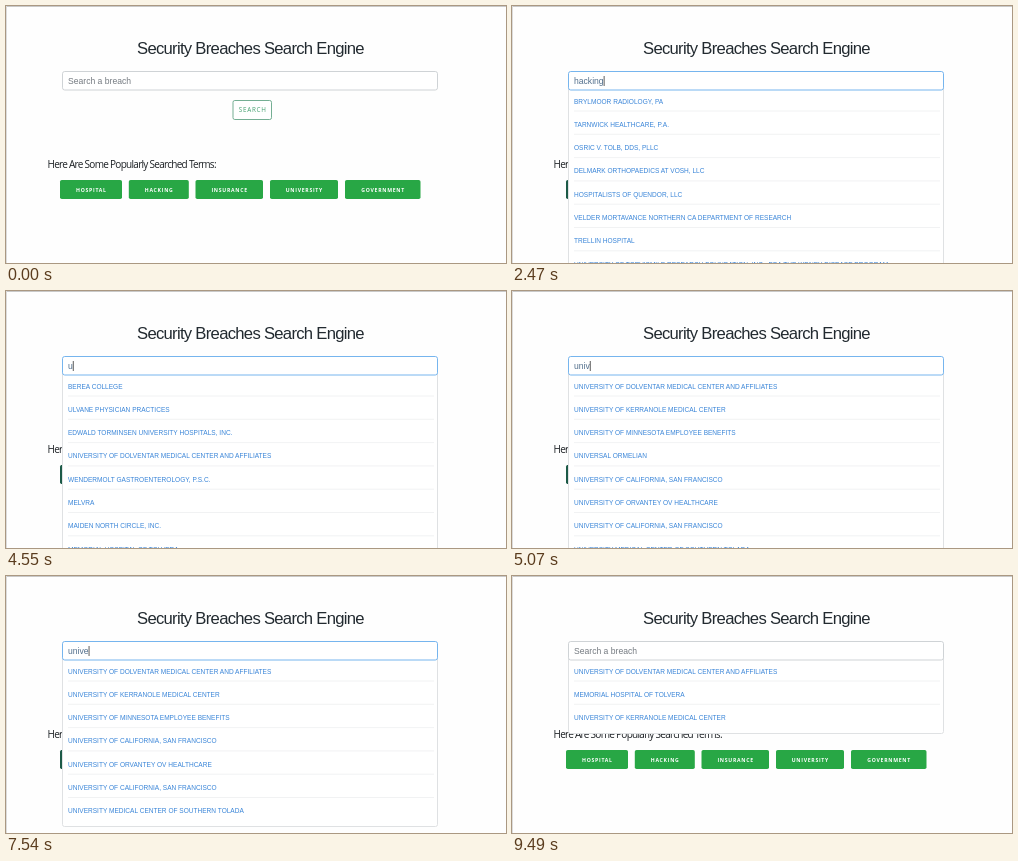
An HTML page that plays this animation: 500x257 px, repeating every 9.62 s.

```html
<!DOCTYPE html>
<html lang="en">
<head>
<meta charset="utf-8">
<title>Security Breaches Search Engine</title>
<style>
  html, body { margin: 0; width: 100%; height: 100%; overflow: hidden; background: #fefefe; }
  svg { display: block; width: 100%; height: 100%; font-family: "Liberation Sans", Arial, sans-serif; }
  text { white-space: pre; }
  .title { font-size: 16.66px; letter-spacing: -.715px; fill: #222a30; }
  .heading { font: 10px "Open Sans", sans-serif; letter-spacing: -.715px; fill: #1c2024; }
  .search { font: 6.3px "Open Sans", sans-serif; letter-spacing: .715px; fill: #45a070; }
  .term { font: bold 5.15px "Open Sans", sans-serif; letter-spacing: .715px; fill: #fff; text-anchor: middle; }
  .query { font-size: 8.6px; }
  .row { font-size: 6.55px; fill: #3b86d8; }
</style>
</head>
<body>
<svg viewBox="0 0 500 257">
  <path d="M0 .5H500" stroke="#c9c9c9"/>
  <path d="M.5 0V257" stroke="#dcdcdc"/>
  <text class="title" x="131" y="48">Security Breaches Search Engine</text>
  <rect x="227" y="94.5" width="38.5" height="19" rx="1.8" fill="#fff" stroke="#74ae93"/>
  <text class="search" x="232.8" y="106.2">SEARCH</text>
  <text class="heading" x="41.5" y="162">Here Are Some Popularly Searched Terms:</text>
  <g id="terms"></g>
  <g id="lists"></g>
  <rect id="field" x="56.5" y="65.5" width="375" height="18.5" rx="2.2" fill="#fff"/>
  <text id="query" class="query" x="62" y="78"></text>
  <path id="caret" d="M.5 70V80" stroke="#333" stroke-width=".8"/>
</svg>
<script>
const LOOP = 9620, BLINK = 520, ROW = 23.3;
const $ = id => document.getElementById(id);

function add(parent, tag, attrs, text = '') {
  const node = document.createElementNS('http://www.w3.org/2000/svg', tag);
  for (const key in attrs) node.setAttribute(key, attrs[key]);
  node.textContent = text;
  return parent.appendChild(node);
}

const dolventar = 'UNIVERSITY OF DOLVENTAR MEDICAL CENTER AND AFFILIATES';
const kerranole = 'UNIVERSITY OF KERRANOLE MEDICAL CENTER';
const minnesota = 'UNIVERSITY OF MINNESOTA EMPLOYEE BENEFITS';
const california = 'UNIVERSITY OF CALIFORNIA, SAN FRANCISCO';
const orvantey = 'UNIVERSITY OF ORVANTEY OV HEALTHCARE';
const tolada = 'UNIVERSITY MEDICAL CENTER OF SOUTHERN TOLADA';
const tolvera = 'MEMORIAL HOSPITAL OF TOLVERA';

const results = {
  hacking: [
    'BRYLMOOR RADIOLOGY, PA',
    'TARNWICK HEALTHCARE, P.A.',
    'OSRIC V. TOLB, DDS, PLLC',
    'DELMARK ORTHOPAEDICS AT VOSH, LLC',
    'HOSPITALISTS OF QUENDOR, LLC',
    'VELDER MORTAVANCE NORTHERN CA DEPARTMENT OF RESEARCH',
    'TRELLIN HOSPITAL',
    'UNIVERSITY OF TORVISMILE RESEARCH FOUNDATION, INC., DBA THE KIDNEY DISEASE PROGRAM'
  ],
  mixed: [
    'BEREA COLLEGE',
    'ULVANE PHYSICIAN PRACTICES',
    'EDWALD TORMINSEN UNIVERSITY HOSPITALS, INC.',
    dolventar,
    'WENDERMOLT GASTROENTEROLOGY, P.S.C.',
    'MELVRA',
    'MAIDEN NORTH CIRCLE, INC.',
    tolvera
  ],
  univers: [dolventar, kerranole, minnesota, 'UNIVERSAL ORMELIAN', california, orvantey, california, tolada],
  university: [dolventar, kerranole, minnesota, california, orvantey, california, tolada],
  short: [dolventar, tolvera, kerranole]
};

// Each table holds [start in ms, value].
const typing = [
  [0, ''],
  ...[...'hacking'].map((_, i) => [1690 + 130 * i, 'hacking'.slice(0, i + 1)]),
  [2990, 'hackin'], [3510, 'ha'], [3640, ''],
  [4550, 'u'], [4810, 'un'], [4940, 'uni'], [5070, 'univ'], [5200, 'unive'],
  [5330, 'univer'], [5460, 'univers'], [5720, 'universi'], [5850, 'universit'], [6110, 'university'],
  [7020, 'universit'], [7540, 'unive'], [7670, 'u'], [7800, '']
];
const listing = [
  [0, ''], [1820, 'hacking'], [3900, 'mixed'], [5070, 'univers'],
  [6110, 'university'], [8060, 'short']
];
const borders = [
  [0, '#cfd3d6'], [1560, '#83c6cf'], [1690, '#76b5ee'], [9360, '#a9c6de'], [9490, '#cfd3d6']
];
const at = (table, t) => table.findLast(step => step[0] <= t);

const terms = [
  ['HOSPITAL', 54, 62], ['HACKING', 122.8, 60], ['INSURANCE', 189.5, 67.5],
  ['UNIVERSITY', 264, 68], ['GOVERNMENT', 339, 75.5]
].map(([label, x, width]) => {
  const box = add($('terms'), 'rect', { x, y: 174, width, height: 19, rx: 1.8, fill: '#28a745' });
  add($('terms'), 'text', { class: 'term', x: x + width / 2 + .36, y: 185.8 }, label);
  return box;
});

const panels = Object.entries(results).map(([name, rows]) => {
  const panel = add($('lists'), 'g', {});
  const bottom = rows.length > 7 ? 280 : 87 + ROW * rows.length;
  add(panel, 'rect', {
    x: 56.5, y: 80.5, width: 375, height: Math.round(bottom - 80), rx: 2, fill: '#fff', stroke: '#dfe1e3'
  });
  rows.forEach((row, i) => {
    const y = 97.5 + ROW * i;
    add(panel, 'text', { class: 'row', x: 62, y }, row);
    if (i < rows.length - 1) add(panel, 'path', { d: `M62 ${y + 7.5}H428`, stroke: '#eeeff0', 'stroke-width': .8 });
  });
  return [name, panel];
});

function draw(now) {
  const t = now % LOOP;
  const [typedAt, text] = at(typing, t);
  const list = at(listing, t)[1];
  const focused = t >= 1690 && t < 9360;

  $('query').textContent = text || 'Search a breach';
  $('query').setAttribute('fill', text ? '#526f8c' : '#747a80');
  $('field').setAttribute('stroke', at(borders, t)[1]);

  const lit = focused && Math.floor((t - typedAt) / BLINK) % 2 === 0;
  const end = text ? $('query').getComputedTextLength() : 0;
  $('caret').setAttribute('visibility', lit ? 'visible' : 'hidden');
  $('caret').setAttribute('transform', `translate(${62 + end})`);

  for (const [name, panel] of panels) panel.setAttribute('display', name === list ? 'inline' : 'none');
  terms[0].setAttribute('fill', list && list !== 'short' ? '#1c5a47' : '#28a745');
}

const start = performance.now();
function tick() {
  draw(performance.now() - start);
  requestAnimationFrame(tick);
}
tick();
</script>
</body>
</html>
```
